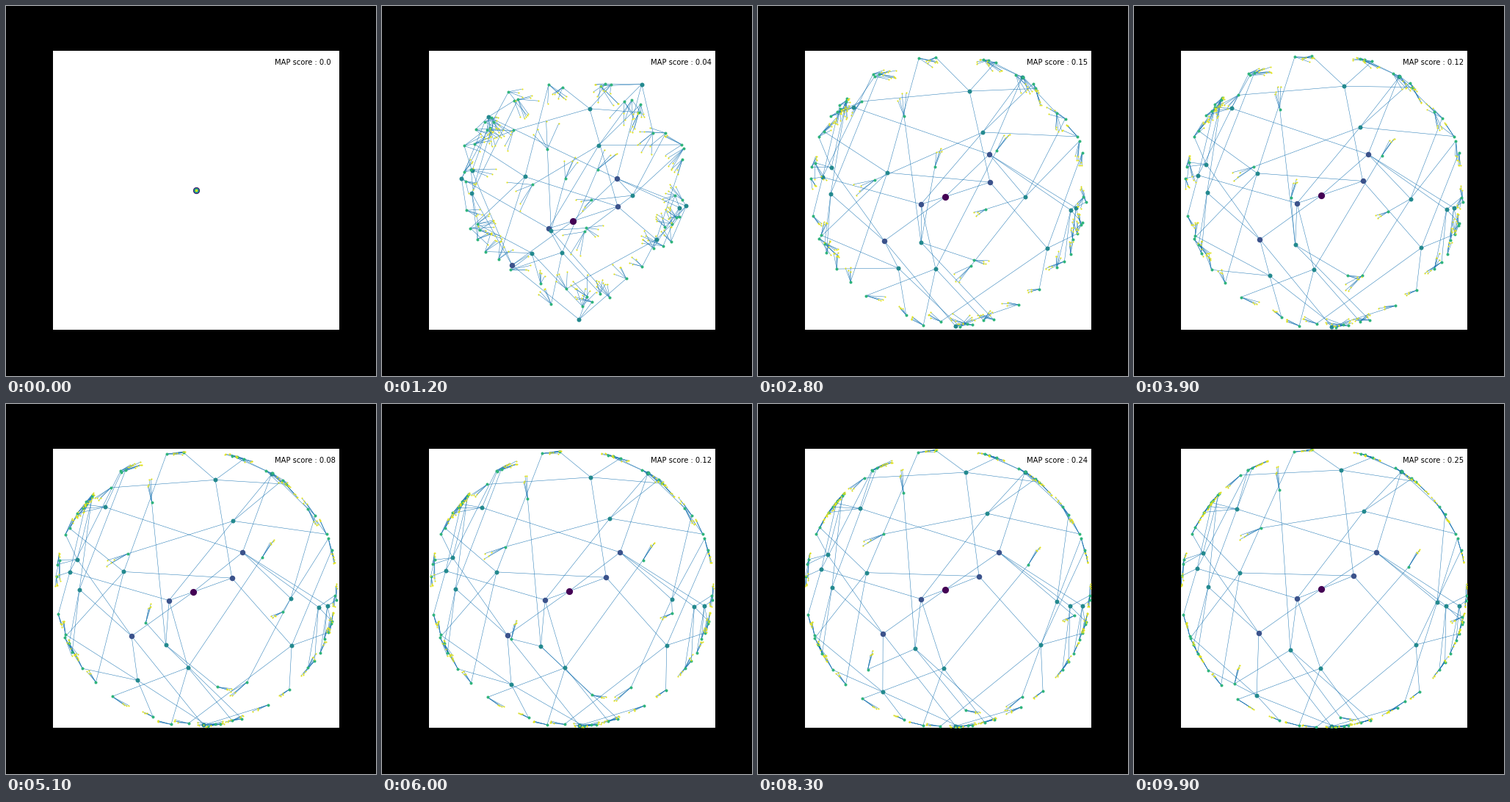
These frames come from a looping animation (504 by 504 pixels, 10000 ms). A matplotlib script:

```python
import numpy as np
import matplotlib.pyplot as plt
from matplotlib.animation import FuncAnimation
from matplotlib.collections import LineCollection

SIZE, FRAMES, STEP = 504, 100, 100
LEFT, RIGHT, TOP, BOTTOM = 64, 454, 61, 441
CENTER, RX, RY = 258.5 + 251j, 195, 190
BURST, SPREAD, END = 1.2, 2.8, 9.9    # seconds: first burst, disk filled, last pose

rng = np.random.default_rng(7)
parent, level, spread_at, end_at = [], [], [], []
fans = {}    # outer node -> (direction in degrees, or None along the rim; length)


def to_disk(x, y):
    return (x - CENTER.real) / RX + 1j * (y - CENTER.imag) / RY


def to_px(z):
    return np.column_stack([CENTER.real + RX * z.real, CENTER.imag + RY * z.imag])


def scale_hyperbolic(z, k):
    r = np.maximum(np.abs(z), 1e-9)
    return z / r * np.tanh(k * np.arctanh(r))


def add(par, z, z_end):
    parent.append(par)
    level.append(0 if par is None else level[par] + 1)
    spread_at.append(z)
    end_at.append(z_end)
    return len(parent) - 1


def node(par, x, y, x_end, y_end):
    return add(par, to_disk(x, y), to_disk(x_end, y_end))


def hub(par, x, y, x_end, y_end, *angles):
    """Inner node with children that drift out to the rim at these angles."""
    me = node(par, x, y, x_end, y_end)
    for deg in angles:
        z = rng.uniform(0.94, 0.985) * np.exp(1j * np.radians(deg))
        child = add(me, z, scale_hyperbolic(z, 1.9))
        fans[child] = (None, rng.uniform(13, 28))
    return me


def wanderer(par, x, y, x_end, y_end, fan, length=30):
    """Outer node that stays inside the disk, leaves fanned one way."""
    fans[node(par, x, y, x_end, y_end)] = (fan, length)


root = node(None, 255, 260, 255, 252)
a = node(root, 315, 202, 330, 202)
b = node(root, 316, 240, 299, 234)
c = node(root, 222, 270, 222, 265)
d = node(root, 172, 320, 170, 312)

hub(a, 360, 97, 364, 92, -75, -73, -60, -36)
hub(a, 130, 138, 140, 143, -147, -144, -142, -122)
east = hub(a, 364, 260, 413, 270, -21, -32)
hub(a, 426, 278, 425, 275, 3, 14, 36, 32)
hub(a, 433, 275, 443, 275, 5, 15, 22, 28)
north = hub(b, 288, 116, 282, 90, -95, -70, -50)
hub(b, 176, 227, 144, 230, -154, -102, 136, 159)
hub(b, 394, 330, 384, 328, 19, 93, 48, -16)
upper = hub(c, 306, 172, 313, 146, -23, -57, -52)
hub(c, 88, 233, 86, 224, 169, -175, -122, -141)
middle = hub(c, 222, 322, 213, 335, 71)
lower = hub(c, 242, 358, 254, 360, 127, 100, 75)
hub(d, 100, 220, 94, 203, -168, -170, -157, -137)
hub(d, 99, 256, 101, 249, 152, 156, -120, -138)
hub(d, 191, 357, 167, 397, 160, 108, 85, 144)
hub(d, 269, 436, 269, 439, 80, 82, 59)

wanderer(east, 290, 354, 369, 405, 145)
wanderer(east, 310, 277, 447, 290, 155, 16)
wanderer(north, 141, 130, 145, 97, 140)
wanderer(upper, 159, 237, 173, 169, 157)
wanderer(middle, 199, 150, 198, 117, 263)
wanderer(middle, 241, 219, 137, 381, 283)
wanderer(middle, 294, 346, 281, 427, 10, 19)
wanderer(lower, 325, 197, 374, 222, 300)

level, spread_at, end_at = map(np.array, (level, spread_at, end_at))
inner = np.arange(1, len(parent))
outer_of = np.array(parent[1:])
early = np.array([1, 1, 0.75, 0.5])[level]
drift = np.where(level < 2, 5 / RX + 33j / RY, 0)

# Four leaves per outer node
holders = np.repeat(list(fans), 4)
on_rim = np.array([fans[i][0] is None for i in holders])
fixed = np.array([fans[i][0] or 0 for i in holders], float)
reach = np.array([fans[i][1] for i in holders]) * rng.uniform(0.65, 1.1, len(holders))
side = np.repeat(rng.choice([-1, 1], len(fans)), 4)
jitter = rng.uniform(-1, 1, len(holders))


def place_nodes(t):
    if t < SPREAD:
        burst = min(t / BURST, 1) ** 0.5
        settle = max(t - BURST, 0) / (SPREAD - BURST)
        k = burst * (early + (1 - early) * settle)
        return scale_hyperbolic(spread_at, k) + burst * (1 - settle) * drift
    ease = (1 - np.exp((SPREAD - t) / 5)) / (1 - np.exp((SPREAD - END) / 5))
    return spread_at + (end_at - spread_at) * ease


def place_leaves(t, z):
    """Loose inward fans that narrow and lie down along the rim."""
    marks = [BURST, SPREAD, 5.1, END]
    lean = np.interp(t, marks, [60, 28, 6, 3])
    width = np.interp(t, marks, [45, 18, 8, 6])
    base = z[holders]
    along = np.degrees(np.angle(base)) + side * (90 + lean)
    angle = np.where(on_rim, along, fixed) + width * jitter
    size = min(t / BURST, 1) ** 0.5 * np.interp(t, marks[:2], [1.2, 1])
    off = size * reach * np.exp(1j * np.radians(angle))
    leaf = base + off.real / RX + 1j * off.imag / RY
    limit = np.interp(t, [0] + marks[:3], [0.5, 0.84, 0.985, 0.996])
    return leaf * np.minimum(1, limit / np.maximum(np.abs(leaf), 1e-9))


fig = plt.figure(figsize=(SIZE / 72, SIZE / 72), dpi=72, facecolor="black")
ax = fig.add_axes([LEFT / SIZE, 1 - BOTTOM / SIZE,
                   (RIGHT - LEFT) / SIZE, (BOTTOM - TOP) / SIZE])
ax.set(xlim=(LEFT, RIGHT), ylim=(BOTTOM, TOP), xticks=[], yticks=[])
ax.spines[:].set_visible(False)

edges = LineCollection([], colors="#1f77b4", linewidths=0.5, zorder=1)
ax.add_collection(edges)
shades = plt.get_cmap("viridis")([0, 0.25, 0.47, 0.65, 0.96])
dots = [ax.scatter([], [], s=w * w, color=col, linewidths=0, zorder=2 + k)
        for k, (w, col) in enumerate(zip([9.2, 7.5, 6, 4, 2.1], shades))]
label = ax.text(366, 80, "", fontsize=10, family="DejaVu Sans", zorder=9)


def draw(i):
    t = i * STEP / 1000
    z = place_nodes(t)
    nodes, leaves = to_px(z), to_px(place_leaves(t, z))
    edges.set_segments(np.concatenate([
        np.stack([nodes[outer_of], nodes[inner]], axis=1),
        np.stack([nodes[holders], leaves], axis=1)]))
    for k in range(4):
        dots[k].set_offsets(nodes[level == k])
    dots[4].set_offsets(leaves)
    score = np.interp(t, [0, 1.2, 2.8, 5.1, 6, 8.3, 9.9],
                      [0, 0.04, 0.15, 0.08, 0.12, 0.24, 0.25])
    label.set_text(f"MAP score : {round(float(score), 2)}")
    return [edges, *dots, label]


anim = FuncAnimation(fig, draw, frames=FRAMES, interval=STEP, repeat=True)
plt.show()
```
